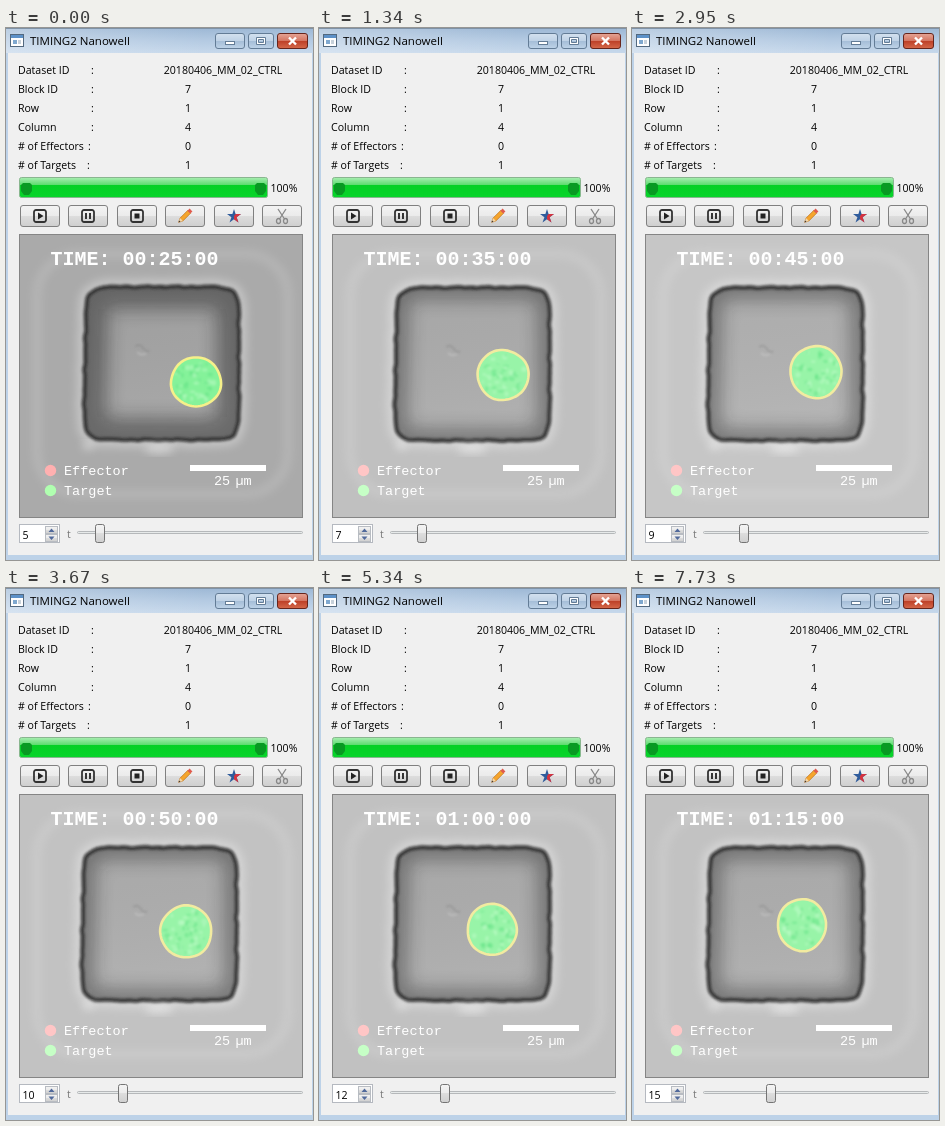
An HTML page for the animation above (8000 ms loop, 307 by 532 pixels).

```html
<!DOCTYPE html>
<html lang="en">
<head>
<meta charset="utf-8">
<title>Nanowell viewer</title>
<style>
  html, body { margin: 0; height: 100%; overflow: hidden; background: #f0f0f0; }
  svg { display: block; width: 100%; height: 100%; }
  text { font: 10.6px "Open Sans", "Noto Sans", sans-serif; fill: #000; white-space: pre; }
  .title { font-size: 11.5px; }
  .mono { font: 13.5px "Liberation Mono", monospace; fill: #fff; }
  .clock { font-size: 20px; font-weight: bold; }
  .mid { text-anchor: middle; }
</style>
</head>
<body>
<svg viewBox="0 0 307 532">
  <defs>
    <linearGradient id="bar" x2="0" y2="1">
      <stop stop-color="#9db8d5"/><stop offset=".5" stop-color="#b4cae2"/><stop offset="1" stop-color="#c6d8eb"/>
    </linearGradient>
    <linearGradient id="glow" x2="1" y2="0">
      <stop stop-color="#fff" stop-opacity=".3"/><stop offset="1" stop-color="#fff" stop-opacity="0"/>
    </linearGradient>
    <linearGradient id="button" x2="0" y2="1">
      <stop stop-color="#f3f3f3"/><stop offset=".5" stop-color="#ebebeb"/>
      <stop offset=".5" stop-color="#dddddd"/><stop offset="1" stop-color="#cfcfcf"/>
    </linearGradient>
    <linearGradient id="caption" x2="0" y2="1">
      <stop stop-color="#d3e1ef"/><stop offset=".5" stop-color="#bfd2e6"/>
      <stop offset=".5" stop-color="#a4bdd7"/><stop offset="1" stop-color="#bed3e8"/>
    </linearGradient>
    <linearGradient id="close" x2="0" y2="1">
      <stop stop-color="#e5a596"/><stop offset=".5" stop-color="#d47460"/>
      <stop offset=".5" stop-color="#bd3f27"/><stop offset="1" stop-color="#d5694a"/>
    </linearGradient>
    <linearGradient id="progress" x2="0" y2="1">
      <stop stop-color="#a9eeb2"/><stop offset=".36" stop-color="#5fdc70"/>
      <stop offset=".4" stop-color="#06d025"/><stop offset="1" stop-color="#08d52b"/>
    </linearGradient>
    <linearGradient id="wellShade" x2=".15" y2="1">
      <stop stop-opacity=".03"/><stop offset="1" stop-color="#fff" stop-opacity=".06"/>
    </linearGradient>
    <filter id="soft1" x="-20%" y="-20%" width="140%" height="140%"><feGaussianBlur stdDeviation=".8"/></filter>
    <filter id="soft4" x="-20%" y="-20%" width="140%" height="140%"><feGaussianBlur stdDeviation="4"/></filter>
    <filter id="soft9" x="-30%" y="-30%" width="160%" height="160%"><feGaussianBlur stdDeviation="9"/></filter>
    <clipPath id="view"><rect x="14" y="207" width="282" height="282"/></clipPath>
    <clipPath id="wellClip"><path class="wall"/></clipPath>
    <clipPath id="cellClip"><path id="cellClipPath"/></clipPath>
  </defs>

  <!-- window frame -->
  <rect width="307" height="532" fill="#bdd2e8"/>
  <rect x="2" y="25" width="304" height="502" fill="#f0f0f0"/>
  <rect width="307" height="25" fill="url(#bar)"/>
  <rect width="200" height="25" fill="url(#glow)"/>
  <path d="M0 .5H307" stroke="#7f92a6"/>
  <rect x="4.5" y="6.5" width="13" height="12" fill="#fff" stroke="#53697f"/>
  <path d="M5 8.5H17" stroke="#5d91c8" stroke-width="3"/>
  <path d="M7 12h4v4h-4z" fill="#7fa8cf"/><path d="M12 12h3v4h-3z" fill="#c7d1da"/>
  <text class="title" x="24" y="17">TIMING2 Nanowell</text>
  <g stroke="#637c96">
    <rect x="209.5" y="5.5" width="29" height="15" rx="2.5" fill="url(#caption)"/>
    <rect x="242.5" y="5.5" width="25" height="15" rx="2.5" fill="url(#caption)"/>
    <rect x="271.5" y="5.5" width="30" height="15" rx="2.5" fill="url(#close)" stroke="#66251c"/>
    <rect x="219.5" y="13.5" width="9" height="3" fill="#fff"/>
    <path d="M250.5 9.5h9v7h-9zM252.5 11.5h5v3h-5z" fill="#fff" fill-rule="evenodd"/>
  </g>
  <path d="M283 9.5l7 7m0-7l-7 7" stroke="#fff" stroke-width="2.4"/>

  <g id="rows"></g>

  <rect x="13.5" y="149.5" width="248" height="20" rx="2" fill="url(#progress)" stroke="#89b68f"/>
  <path d="M15 157l2-2h7l2 2v6l-3 4h-5l-3-4zM249 157l2-2h7l2 2v6l-3 4h-5l-3-4z" fill="#089a22"/>
  <text x="264.5" y="164">100%</text>

  <g id="buttons"></g>

  <!-- micrograph -->
  <rect x="13.5" y="206.5" width="283" height="283" fill="#bbb" stroke="#858585"/>
  <g clip-path="url(#view)">
    <rect id="ground" x="14" y="207" width="282" height="282"/>
    <rect x="31" y="226" width="251" height="240" rx="42" fill="none" stroke="#fff" stroke-width="9" opacity=".13" filter="url(#soft4)"/>
    <g id="well">
      <path class="wall" fill="none" stroke="#fff" stroke-width="16" opacity=".3" filter="url(#soft4)"/>
      <path class="wall" id="floor"/>
      <path class="wall" fill="url(#wellShade)"/>
      <g clip-path="url(#wellClip)">
        <path class="wall" id="rim" fill="none" stroke="#222" filter="url(#soft9)"/>
        <g filter="url(#soft1)" fill="none">
          <path d="M127 319q5-3 8 2t6 2" stroke="#777" stroke-width="2" opacity=".3"/>
          <path d="M129 325q4 4 9 1" stroke="#ddd" stroke-width="2" opacity=".3"/>
        </g>
      </g>
      <path class="wall" fill="none" stroke="#444" stroke-width="5.5" opacity=".5" filter="url(#soft1)"/>
      <path class="wall" fill="none" stroke="#2a2a2a" stroke-width="2.4" opacity=".85" filter="url(#soft1)"/>
    </g>
    <g fill="#fff" filter="url(#soft4)" opacity=".4">
      <ellipse cx="153" cy="421" rx="15" ry="5"/><ellipse cx="82" cy="418" rx="6" ry="4"/>
    </g>
    <path id="cell"/>
    <g clip-path="url(#cellClip)"><g id="granules" filter="url(#soft1)"></g></g>
    <path id="contour" fill="none" stroke-width="2.6"/>

    <text class="mono clock" id="clock" x="44.5" y="237"></text>
    <circle id="effector" cx="44.5" cy="442.5" r="5.7"/>
    <circle id="target" cx="44.5" cy="462.5" r="5.7"/>
    <text class="mono" x="58" y="447">Effector</text>
    <text class="mono" x="58" y="467">Target</text>
    <rect x="184" y="437" width="76" height="6" fill="#fff"/>
    <text class="mono" x="208" y="457">25</text>
    <text class="mono" x="229.5" y="457">µm</text>
  </g>

  <!-- frame selector -->
  <rect x="13.5" y="496.5" width="40" height="18" fill="#fff" stroke="#b5b9c0"/>
  <g fill="url(#button)" stroke="#b8bcc2">
    <rect x="39.5" y="498.5" width="12" height="7"/><rect x="39.5" y="506.5" width="12" height="7"/>
  </g>
  <path d="M42.5 504l3-3.5 3 3.5zM42.5 508.5l3 3.5 3-3.5z" fill="#50699b"/>
  <text id="index" x="16.5" y="510.5"></text>
  <text x="61" y="510" style="fill:#777">t</text>
  <rect x="71.5" y="503.5" width="225" height="2" rx="1" fill="#e7eaea" stroke="#b5b8ba"/>
  <rect id="handle" y="496.5" width="9" height="18" rx="2" fill="url(#button)" stroke="#747474"/>
</svg>

<script>
const $ = id => document.getElementById(id);
const set = (id, attributes) => {
  for (const [name, value] of Object.entries(attributes)) $(id).setAttribute(name, value);
};
const gray = v => `rgb(${v},${v},${v})`;

const LOOP = 8000, FIRST_INDEX = 5;
const starts = [0, 440, 1340, 2080, 2950, 3670, 4570, 5340, 6090, 6990, 7730];
// Cell centre and radii at each step
const cells = [
  [190, 354, 25, 24.5], [185.5, 348.5, 26, 24.5], [184, 347, 25.5, 25],
  [182.5, 345, 25, 25], [184, 344, 25.5, 26], [180, 343.5, 25.5, 26],
  [175, 343, 25, 25.5], [173, 341.5, 24.5, 25.5], [171, 340.5, 24.5, 26],
  [170.5, 338.5, 24, 26], [170, 337, 24, 26]
];
const groundShade = [170, 199, 192, 178, 198, 194, 195, 193, 191, 192, 194];

function seeded(seed) {
  return () => (seed = seed * 16807 % 2147483647) / 2147483647;
}

function closedPath(count, point) {
  let d = "";
  for (let i = 0; i < count; i++) {
    d += (i ? "L" : "M") + point(i / count * Math.PI * 2).map(v => v.toFixed(1));
  }
  return d + "Z";
}

// Rounded square with a slightly ragged edge
const wellPath = closedPath(360, a => {
  const c = Math.cos(a), s = Math.sin(a), power = 9.5;
  const r = (Math.abs(c) ** power + Math.abs(s) ** power) ** (-1 / power);
  const rough = .3 * Math.sin(17 * a) + .25 * Math.sin(31 * a + 1) + .15 * Math.sin(47 * a + 2);
  const x = c * r * (77 + rough), y = s * r * (76.5 + rough);
  return [153.7 + x - (x < 0 ? 1.5 * s : 0), 336 + y];
});

function cellPath([x, y, rx, ry], step) {
  return closedPath(72, a => {
    const r = 1 + .01 * Math.sin(3 * a + step) + .008 * Math.sin(5 * a + 2 * step);
    return [x + rx * r * Math.cos(a), y + ry * r * Math.sin(a)];
  });
}

function granules([x, y, rx, ry], step) {
  const random = seeded(811 + step * 97);
  return Array.from({ length: 46 }, (_, i) => {
    const a = random() * Math.PI * 2, d = Math.sqrt(random()) * .86;
    const color = i % 2 ? "#5fe083" : "#c4fccd";
    return `<ellipse cx="${x + rx * d * Math.cos(a)}" cy="${y + ry * d * Math.sin(a)}"
      rx="${1 + random() * 2}" ry="${1 + random() * 2}" fill="${color}" opacity=".45"/>`;
  }).join("");
}

function buildPanel() {
  const rows = [
    ["Dataset ID", 85, "20180406_MM_02_CTRL", 217], ["Block ID", 85, "7", 182],
    ["Row", 85, "1", 182], ["Column", 85, "4", 182],
    ["# of Effectors", 82, "0", 182], ["# of Targets", 81, "1", 182]
  ];
  $("rows").innerHTML = rows.map(([label, colon, value, x], i) => {
    const y = 46 + i * 19;
    return `<text x="12" y="${y}">${label}</text><text x="${colon}" y="${y}">:</text>
      <text class="mid" x="${x}" y="${y}">${value}</text>`;
  }).join("");

  const frame = '<rect x="-6" y="-6" width="12" height="12" rx="2" fill="none" stroke="#333" stroke-width="1.8"/>';
  const icons = [
    frame + '<path d="M-2-3.5L3.5 0-2 3.5z" fill="#222"/>',
    frame + '<path d="M-2-3V3M2-3V3" stroke="#222" stroke-width="1.8"/>',
    frame + '<path d="M-2.5-2.5h5v5h-5z" fill="#222"/>',
    `<g transform="rotate(45)"><path d="M-2-6h4V5L0 9-2 5z" fill="#f5a52d" stroke="#b56b1c" stroke-width=".6"/>
      <path d="M-2-8.500h4v3h-4z" fill="#e05b4f"/><path d="M-2 5h4L0 9z" fill="#f4d6a8"/><path d="M-1 7.300h2L0 9z" fill="#333"/></g>`,
    `<path d="M0-7L1.600-2 7-2 2.600 1.200 4.500 6.500 0 3.300-4.500 6.500-2.600 1.200-7-2-1.600-2z" fill="#2f5c9c"/>
      <path d="M0 0L1.600-2 7-2 2.600 1.200 4.500 6.500 0 3.300z" fill="#d5333f"/>`,
    `<g fill="none" stroke="#888" stroke-width="1.3"><path d="M-4-7L2.500 3M4-7L-2.500 3"/>
      <ellipse cx="-3.5" cy="5" rx="2" ry="2.5"/><ellipse cx="3.5" cy="5" rx="2" ry="2.5"/></g>`
  ];
  $("buttons").innerHTML = icons.map((icon, i) => {
    const x = Math.round(14 + i * 48.4);
    return `<rect x="${x + .5}" y="177.5" width="39" height="21" rx="2.5" fill="url(#button)" stroke="#808080"/>
      <g transform="translate(${x + 20} 188)">${icon}</g>`;
  }).join("");

  document.querySelectorAll(".wall").forEach(path => path.setAttribute("d", wellPath));
}

function showStep(step) {
  const index = FIRST_INDEX + step, minutes = index * 5;
  const shade = groundShade[step], dim = shade < 185, tint = dim ? 176 : 198;
  const cell = cells[step], outline = cellPath(cell, step);
  const two = n => String(n).padStart(2, "0");

  $("clock").textContent = `TIME: ${two(Math.floor(minutes / 60))}:${two(minutes % 60)}:00`;
  $("index").textContent = index;
  set("handle", { x: Math.round(89 + step * 4.5) + .5 });
  set("ground", { fill: gray(shade) });
  set("floor", { fill: gray(step ? shade - 20 : 164) });
  set("rim", { "stroke-width": step ? 24 : 44, opacity: step ? .4 : .46 });
  set("well", { transform: step ? "" : "translate(2.3 -.7)" });
  set("effector", { fill: `rgb(255,${tint},${tint})` });
  set("target", { fill: `rgb(${tint},255,${tint})` });
  set("cell", { d: outline, fill: dim ? "#85f29a" : "#98f4a8" });
  set("cellClipPath", { d: outline });
  set("contour", { d: outline, stroke: dim ? "#f6f08a" : "#f2eba0" });
  $("granules").innerHTML = granules(cell, step);
}

let shown = -1;
function tick() {
  const time = performance.now() % LOOP;
  const step = starts.filter(start => start <= time).length - 1;
  if (step !== shown) showStep(shown = step);
  requestAnimationFrame(tick);
}

buildPanel();
tick();
</script>
</body>
</html>
```
